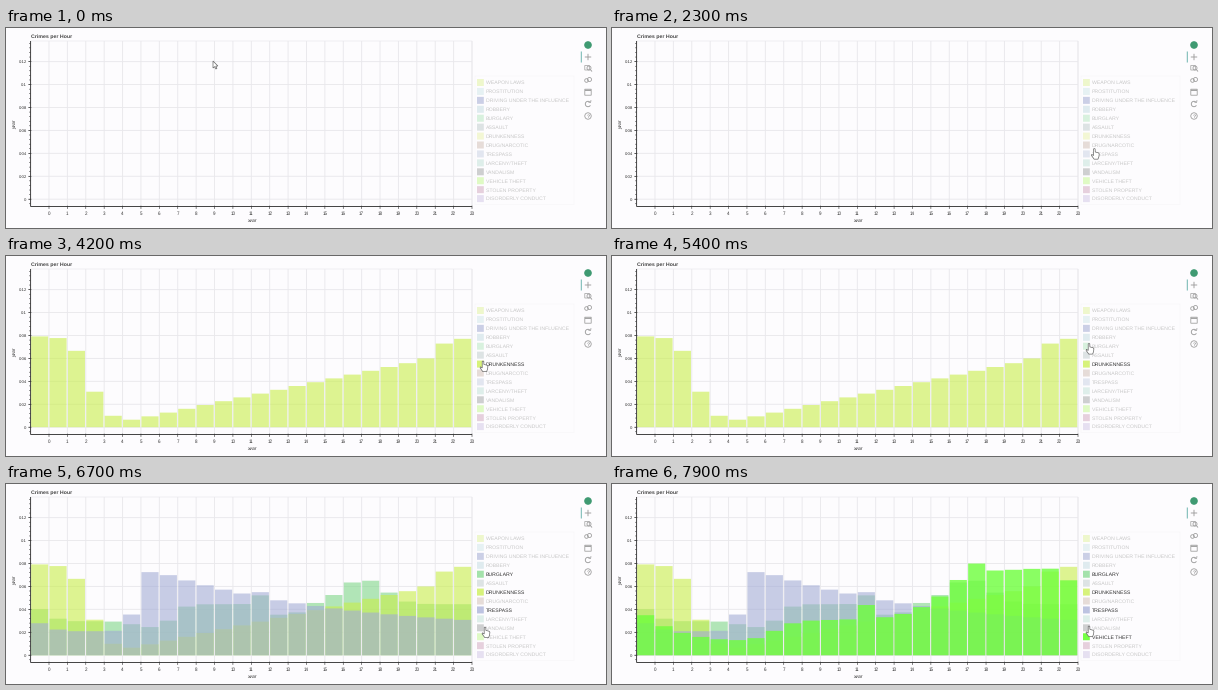
A matplotlib script for the animation above (8 s loop, 600 by 200 pixels).

```python
import numpy as np
import matplotlib.pyplot as plt
from matplotlib.animation import FuncAnimation
from matplotlib.patches import Circle, Polygon, Rectangle

W, H, DPI = 600, 200, 100
FRAMES, INTERVAL = 80, 100
PT = 72 / DPI
LEFT, RIGHT, TOP, BOTTOM, ZERO = 24.6, 466, 13, 178.5, 171.2
STEP_X = (RIGHT - LEFT) / 24
STEP_Y = 22.93
PAPER, GRID, INK, ICON, MUTED = "#fdfcfe", "#e9e8ec", "#333333", "#9c9c9c", "#c8c8c8"

plt.rcParams.update({"font.family": "Liberation Sans", "text.hinting": "none",
                     "path.snap": False, "toolbar": "None"})

fig = plt.figure(figsize=(W / DPI, H / DPI), dpi=DPI, facecolor=PAPER)
ax = fig.add_axes([0, 0, 1, 1])
ax.set_xlim(0, W)
ax.set_ylim(H, 0)
ax.axis("off")


def line(xs, ys, color=INK, width=0.6, z=1):
    ax.plot(xs, ys, color=color, lw=width * PT, zorder=z, solid_capstyle="butt")


def label(x, y, text, size, color="#444444", ha="center", **style):
    return ax.text(x, y, text, fontsize=size * PT, color=color, ha=ha,
                   va="center_baseline", zorder=6, **style)


def box(x, y, w, h, fill="none", edge="none", width=0.6, z=1, alpha=None):
    return ax.add_patch(Rectangle((x, y), w, h, fc=fill, ec=edge,
                                  lw=width * PT, zorder=z, alpha=alpha))


def ring(x, y, r):
    ax.add_patch(Circle((x, y), r, fc="none", ec=ICON, lw=0.8 * PT))


def draw_axes():
    box(LEFT, TOP, RIGHT - LEFT, BOTTOM - TOP, edge=GRID, z=0)
    for i in range(24):
        x = LEFT + STEP_X * (i + 1)
        line([x, x], [TOP, BOTTOM], GRID, 0.9)
        line([x, x], [BOTTOM - 0.8, BOTTOM + 2.4], z=6)
        label(x, 185, str(i), 4.5, INK)
    for i in range(7):
        y = ZERO - STEP_Y * i
        line([LEFT, RIGHT], [y, y], GRID, 0.9)
        line([LEFT - 2.4, LEFT + 0.8], [y, y], z=6)
        label(20.6, y, f"{0.02 * i:.2g}", 4.3, INK, ha="right")
    for i in range(-1, 35):
        y = ZERO - STEP_Y * i / 5
        line([LEFT - 1.6, LEFT], [y, y], width=0.5, z=6)
    line([LEFT, LEFT], [TOP, BOTTOM], width=0.9, z=6)
    line([LEFT, RIGHT], [BOTTOM, BOTTOM], width=0.9, z=6)
    label(25, 8.5, "Crimes per Hour", 5.25, ha="left", weight="bold")
    label(245.5, 192, "xvar", 5, INK, style="italic")
    ax.text(9, 96.5, "yvar", fontsize=5 * PT, color=INK, rotation=90,
            ha="center", va="center", style="italic")


def draw_toolbar():
    x = 582
    ax.add_patch(Circle((x, 17), 3.8, fc="#3f9a72", ec="none"))
    line([575.3, 575.3], [23.5, 34.5], "#6fb5b0", 1)
    # pan
    line([x - 3.2, x + 3.2], [29, 29], ICON, 0.9)
    line([x, x], [25.8, 32.2], ICON, 0.9)
    # box zoom
    box(x - 3.2, 37.5, 4.5, 4.5, edge=ICON, width=0.7)
    ring(x + 1, 40, 2)
    line([x + 2.3, x + 4], [41.5, 43.5], ICON, 0.9)
    # wheel zoom
    ring(x - 1.5, 52.5, 1.8)
    ring(x + 1.5, 51.5, 2)
    # save
    box(x - 3.2, 61.2, 6.4, 6, edge=ICON, width=0.8)
    line([x - 3, x + 3], [62.3, 62.3], ICON, 1.2)
    # reset
    a = np.linspace(0.5, 5.4, 24)
    line(x + 2.7 * np.cos(a), 76 + 2.7 * np.sin(a), ICON, 0.9)
    line([x + 3, x + 2.6, x + 0.4], [72.2, 74.4, 74.2], ICON, 0.8)
    # help
    ring(x, 88, 3.2)
    label(x, 88.1, "?", 5.2, ICON, weight="bold")


LEGEND = {
    "WEAPON LAWS": "#eef7cc",
    "PROSTITUTION": "#e6f1f3",
    "DRIVING UNDER THE INFLUENCE": "#cbcfe6",
    "ROBBERY": "#dfebef",
    "BURGLARY": "#d8f1de",
    "ASSAULT": "#dde3e4",
    "DRUNKENNESS": "#f3f7d4",
    "DRUG/NARCOTIC": "#e6dcd8",
    "TRESPASS": "#e2e6f0",
    "LARCENY/THEFT": "#deeeea",
    "VANDALISM": "#cecfd0",
    "VEHICLE THEFT": "#dffac4",
    "STOLEN PROPERTY": "#e6d0dd",
    "DISORDERLY CONDUCT": "#e6e0f1",
}


def draw_legend():
    box(469, 48, 99, 128.5, edge="#f7f6f8", z=2)
    entries = {}
    for i, (name, color) in enumerate(LEGEND.items()):
        y = 54.5 + 8.93 * i
        entries[name] = (box(471, y - 3.5, 6.8, 7, fill=color, z=5),
                         label(480, y, name, 5.18, MUTED, ha="left"))
    return entries


def bump(h, center, width):
    return np.exp(-((h - center) / width) ** 2)


def rise(h, center, width):
    return 1 / (1 + np.exp((center - h) / width))


# Bar heights in pixels by hour of the day.
def burglary(h):
    return (34 + 12 * bump(h, 0, 0.8) - 6 * bump(h, 6, 1.2) + 17 * rise(h, 7.4, 0.3)
            + 10 * bump(h, 12, 0.5) - 13 * bump(h, 13.4, 0.9) + 25 * bump(h, 17.6, 1.6))


def drunkenness(h):
    return (7 + 84 * rise(-h, -2.7, 0.45) + 3.8 * np.maximum(h - 5, 0)
            + 13 * rise(h, 21.5, 0.2))


def trespass(h):
    decay = np.exp(-np.maximum(h - 6, 0) / 10)
    return (24 + 8 * bump(h, 0, 0.8) + 62 * rise(h, 5.25, 0.25) * decay
            + 5 * bump(h, 12, 0.5))


def vehicle_theft(h):
    return (12 + 28 * np.exp(-h / 2) + 23 * rise(h, 7, 0.6) + 14 * bump(h, 12, 0.5)
            + 52 * rise(h, 16.2, 1.1) + 14 * bump(h, 17.8, 0.8) - 12 * bump(h, 23, 0.5))


# Name: second of the click, bar colour, opacity, legend colour, heights.
SERIES = {
    "BURGLARY": (5.5, "#7fd789", 0.6, "#a4e2ab", burglary),
    "DRUNKENNESS": (4.2, "#c8ee48", 0.6, "#d7f27b", drunkenness),
    "TRESPASS": (6.4, "#a3acd5", 0.6, "#bdc3e1", trespass),
    "VEHICLE THEFT": (7.3, "#6eff3c", 0.8, "#74ff44", vehicle_theft),
}


def draw_bars(color, alpha, heights, z):
    return [box(LEFT + 0.5 + STEP_X * h, ZERO - v, STEP_X - 1.3, v,
                fill=color, z=z, alpha=alpha)
            for h, v in enumerate(heights(np.arange(24.0)))]


draw_axes()
draw_toolbar()
entries = draw_legend()
bars = {name: draw_bars(color, alpha, heights, 3 + 0.1 * k)
        for k, (name, (_, color, alpha, _, heights)) in enumerate(SERIES.items())}

ARROW = np.array([(0, 0), (0, 7), (1.7, 5.6), (2.8, 8), (3.9, 7.5),
                  (2.8, 5.1), (4.9, 5)])
HAND = np.array([(-0.8, 0.4), (0, 0), (0.8, 0.4), (0.9, 3.4), (4, 4.2),
                 (4.9, 5.2), (4.6, 8), (3.6, 10.6), (-0.2, 10.6),
                 (-2.9, 6.9), (-2.6, 5.8), (-0.8, 7)])
cursor = ax.add_patch(Polygon(ARROW, closed=True, fc="white", ec="#666666",
                              lw=0.7 * PT, zorder=9))

# Cursor moves: start and end second, where the tip arrives.
START = np.array([207, 33])
MOVES = [(0.3, 1.2, (489, 133)), (1.9, 2.6, (478, 112.5)),
         (3.8, 4.1, (477, 105)), (4.7, 5.1, (477, 87.5)),
         (5.8, 6.2, (477, 124.5)), (6.4, 6.7, (479, 143)),
         (6.9, 7.2, (478, 147)), (7.3, 7.6, (477, 142))]
HAND_FROM = 2.3


def cursor_tip(t):
    tip = START
    for begin, end, goal in MOVES:
        u = np.clip((t - begin) / (end - begin), 0, 1)
        tip = tip + (np.array(goal) - tip) * u * u * (3 - 2 * u)
    return tip


def update(frame):
    t = frame * INTERVAL / 1000
    cursor.set_xy((HAND if t >= HAND_FROM else ARROW) + cursor_tip(t))
    for name, (click, _, _, active, _) in SERIES.items():
        shown = t >= click - 1e-6
        for bar in bars[name]:
            bar.set_visible(shown)
        swatch, text = entries[name]
        swatch.set_facecolor(active if shown else LEGEND[name])
        text.set_color(INK if shown else MUTED)
    return [cursor]


anim = FuncAnimation(fig, update, frames=FRAMES, interval=INTERVAL,
                     repeat=True, repeat_delay=0, blit=False)
plt.show()
```
